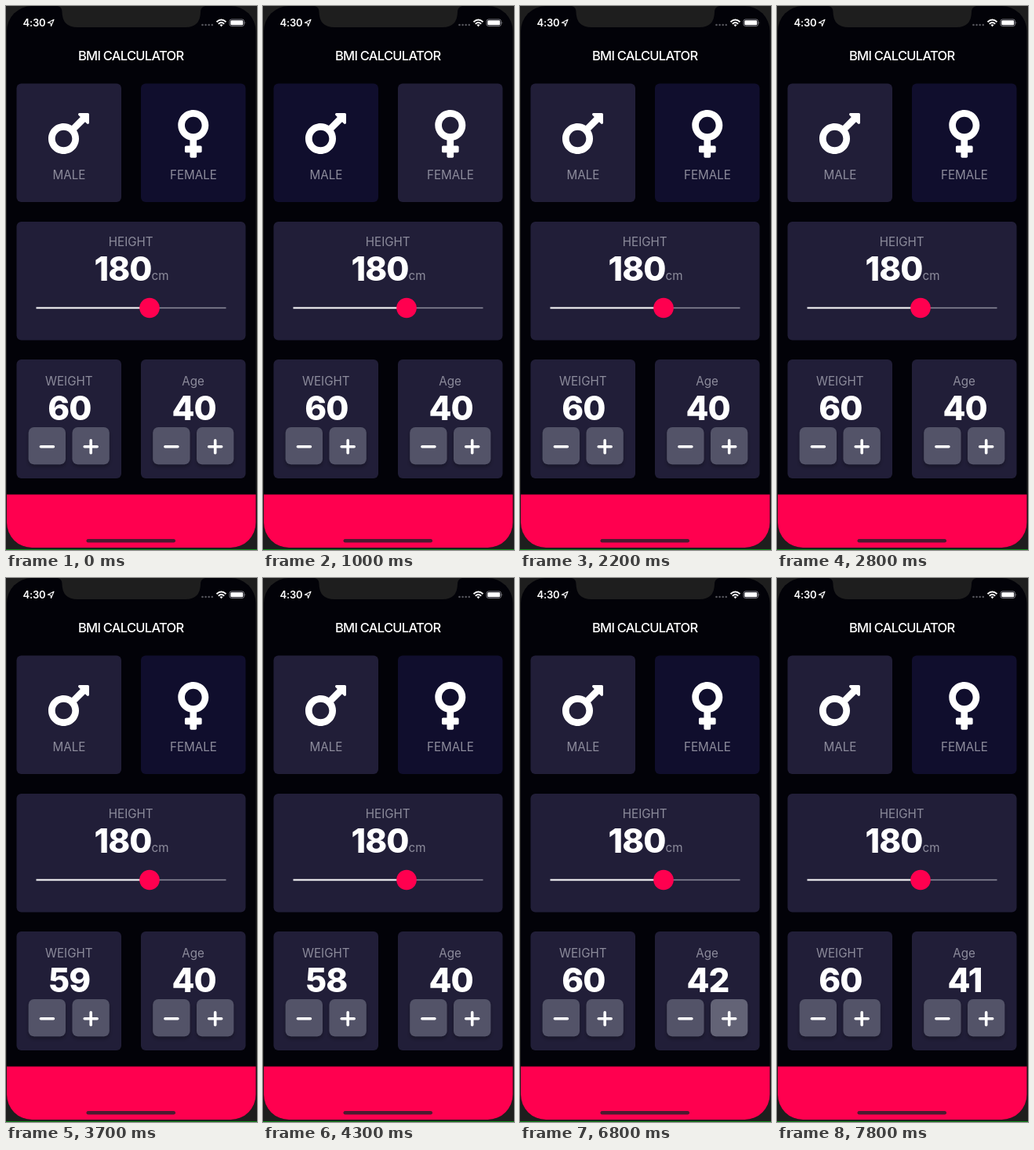
Write an HTML page that moves like this. It is 320 by 691 pixels and loops after 8000 ms.

```html
<!DOCTYPE html>
<html lang="en">
<head>
<meta charset="utf-8">
<title>BMI Calculator</title>
<style>
  html, body { margin: 0; width: 100%; height: 100%; overflow: hidden; background: #1e1e1e; }
  svg { display: block; width: 320px; height: 691px; font-family: Inter, Roboto, sans-serif; }
  text { fill: #fff; text-anchor: middle; }
  .title { font-size: 16.5px; font-weight: 500; letter-spacing: -0.72px; }
  .label { font-size: 15.2px; fill: #8d8c9c; }
  .number { font-size: 42.2px; font-weight: 800; letter-spacing: -1px; }
  .clock { font-size: 13px; font-weight: 600; letter-spacing: -0.2px; }
  .start { text-anchor: start; }
  .card { fill: #211e38; }
</style>
</head>
<body>
<svg viewBox="0 0 320 691" xmlns="http://www.w3.org/2000/svg">
  <defs>
    <clipPath id="screen"><rect x="1" y="0" width="317.5" height="688" rx="32"/></clipPath>
    <filter id="shadow" x="-30%" y="-30%" width="160%" height="170%">
      <feDropShadow dx="0" dy="3" stdDeviation="2.5" flood-color="#000" flood-opacity=".3"/>
    </filter>
  </defs>

  <rect width="320" height="691" fill="#1e1e1e"/>
  <rect y="690" width="320" height="1" fill="#128a1c"/>
  <g clip-path="url(#screen)">
    <rect width="320" height="691" fill="#020208"/>
    <rect y="620.5" width="320" height="70" fill="#ff004f"/>
  </g>
  <path d="M66 0Q71.500 1 71.500 8Q72 27 91 27H229Q247.500 27 248 8Q248 1 254 0Z" fill="#1e1e1e"/>
  <rect x="102.500" y="677" width="113.500" height="4.500" rx="2.250" fill="#4d1a30"/>

  <g id="status">
    <text class="clock start" x="21.500" y="26">4:30</text>
    <path d="M61 17.300L53.300 21.300L57 21.800L57.500 25.500Z" fill="none" stroke="#fff" stroke-width="1.100" stroke-linejoin="round"/>
    <g fill="#55555c">
      <circle cx="250.500" cy="24" r="1.300"/><circle cx="254.600" cy="24" r="1.300"/>
      <circle cx="258.700" cy="24" r="1.300"/><circle cx="262.800" cy="24" r="1.300"/>
    </g>
    <g fill="none" stroke="#fff" stroke-width="1.900">
      <path d="M268.500 20.300Q274.500 14.800 280.500 20.300"/>
      <path d="M270.800 22.700Q274.500 19.300 278.200 22.700"/>
    </g>
    <path d="M272.500 24.100Q274.500 22.500 276.500 24.100L274.500 26.200Z" fill="#fff"/>
    <rect x="285" y="17" width="18.500" height="8.500" rx="2.400" fill="none" stroke="#8a8a90" stroke-width=".9"/>
    <rect x="286.300" y="18.300" width="15.900" height="5.900" rx="1.300" fill="#fff"/>
    <path d="M304.700 19.800Q306.200 21.250 304.700 22.700Z" fill="#8a8a90"/>
  </g>

  <text class="title" x="159.200" y="68.500">BMI CALCULATOR</text>

  <rect id="male" class="card" x="13.500" y="98.500" width="133.500" height="150.500" rx="6"/>
  <rect id="female" class="card" x="172" y="98.500" width="133.500" height="150.500" rx="6"/>
  <rect class="card" x="13.500" y="274" width="292" height="150.500" rx="6"/>
  <rect class="card" x="13.500" y="449" width="133.500" height="151" rx="6"/>
  <rect class="card" x="172" y="449" width="133.500" height="151" rx="6"/>

  <path fill="#fff" transform="translate(54 127.300) scale(.1354)" d="M372 64h-79c-10.700 0-16 12.900-8.500 20.400l16.900 16.900-80.700 80.700C198.500 167.100 172.200 160 144 160 64.500 160 0 224.500 0 304s64.500 144 144 144 144-64.500 144-144c0-28.200-8.100-54.500-22.100-76.700l80.700-80.700 16.900 16.900c7.600 7.600 20.400 2.200 20.400-8.500V76c.1-6.600-5.300-12-11.900-12zM144 384c-44.100 0-80-35.900-80-80s35.900-80 80-80 80 35.900 80 80-35.900 80-80 80z"/>
  <path fill="#fff" transform="translate(219.300 127.700) scale(.1354)" d="M288 176c0-79.500-64.500-144-144-144S0 96.500 0 176c0 68.500 47.900 125.900 112 140.400V368H76c-6.600 0-12 5.400-12 12v40c0 6.600 5.400 12 12 12h36v36c0 6.600 5.400 12 12 12h40c6.600 0 12-5.400 12-12v-36h36c6.600 0 12-5.400 12-12v-40c0-6.600-5.400-12-12-12h-36v-51.600c64.100-14.600 112-71.900 112-140.400zm-224 0c0-44.100 35.900-80 80-80s80 35.900 80 80-35.900 80-80 80-80-35.900-80-80z"/>
  <text class="label" x="80.500" y="220">MALE</text>
  <text class="label" x="239" y="220">FEMALE</text>

  <text class="label" x="159.200" y="304.500">HEIGHT</text>
  <text class="number" x="149" y="348.500">180</text>
  <text class="label start" x="185.500" y="348">cm</text>
  <path d="M183 383.500H280.500" stroke="#8d8c9c" stroke-width="1.700"/>
  <path d="M38.500 383.500H183" stroke="#fff" stroke-width="1.900"/>
  <circle cx="183" cy="383.500" r="12.800" fill="#ff004f"/>

  <text class="label" x="80.300" y="481.500">WEIGHT</text>
  <text class="label" x="238.500" y="481.500">Age</text>
  <text id="weight" class="number" x="80.800" y="525.500">60</text>
  <text id="age" class="number" x="239.500" y="525.500">40</text>
  <g id="buttons"></g>
</svg>
<script>
const LOOP = 8000, FADE = 350;
const ACTIVE = '#211e38', INACTIVE = '#100e2d';
const $ = id => document.getElementById(id);

// Button taps: [time, button, step]
const taps = [
  [3300, 'weightMinus', -1], [3900, 'weightMinus', -1],
  [4700, 'weightPlus', 1], [5200, 'weightPlus', 1],
  [6200, 'agePlus', 1], [6800, 'agePlus', 1], [7400, 'ageMinus', -1]
];
const buttons = { weightMinus: 28.7, weightPlus: 84.5, ageMinus: 187.2, agePlus: 243 };

function drawButton([name, x]) {
  const box = `x="${x}" y="535" width="47.3" height="47.3" rx="7"`;
  const cx = x + 23.7, cy = 559.8;
  const bar = name.endsWith('Plus') ? `M${cx} ${cy - 8}v16` : '';
  return `<rect ${box} fill="#525367" filter="url(#shadow)"/>
    <rect id="${name}" ${box} fill="#fff" opacity="0"/>
    <path d="M${cx - 8} ${cy}h16${bar}" stroke="#fff" stroke-width="3.6" stroke-linecap="round"/>`;
}
$('buttons').innerHTML = Object.entries(buttons).map(drawButton).join('');

function count(field, start, t) {
  return taps.reduce((n, [at, name, step]) =>
    name.startsWith(field) && t >= at ? n + step : n, start);
}

function glow(name, t) {
  return taps.reduce((max, [at, button]) => {
    const p = (t - at) / FADE;
    return button === name && p >= 0 && p < 1 ? Math.max(max, 0.09 * (1 - p)) : max;
  }, 0);
}

function render(t) {
  const male = t >= 600 && t < 1500;
  $('male').style.fill = male ? INACTIVE : ACTIVE;
  $('female').style.fill = male ? ACTIVE : INACTIVE;
  $('weight').textContent = count('weight', 60, t);
  $('age').textContent = count('age', 40, t);
  for (const name in buttons) $(name).setAttribute('opacity', glow(name, t));
}

const origin = performance.now();
function tick() {
  render((performance.now() - origin) % LOOP);
  requestAnimationFrame(tick);
}
render(0);
requestAnimationFrame(tick);
</script>
</body>
</html>
```
